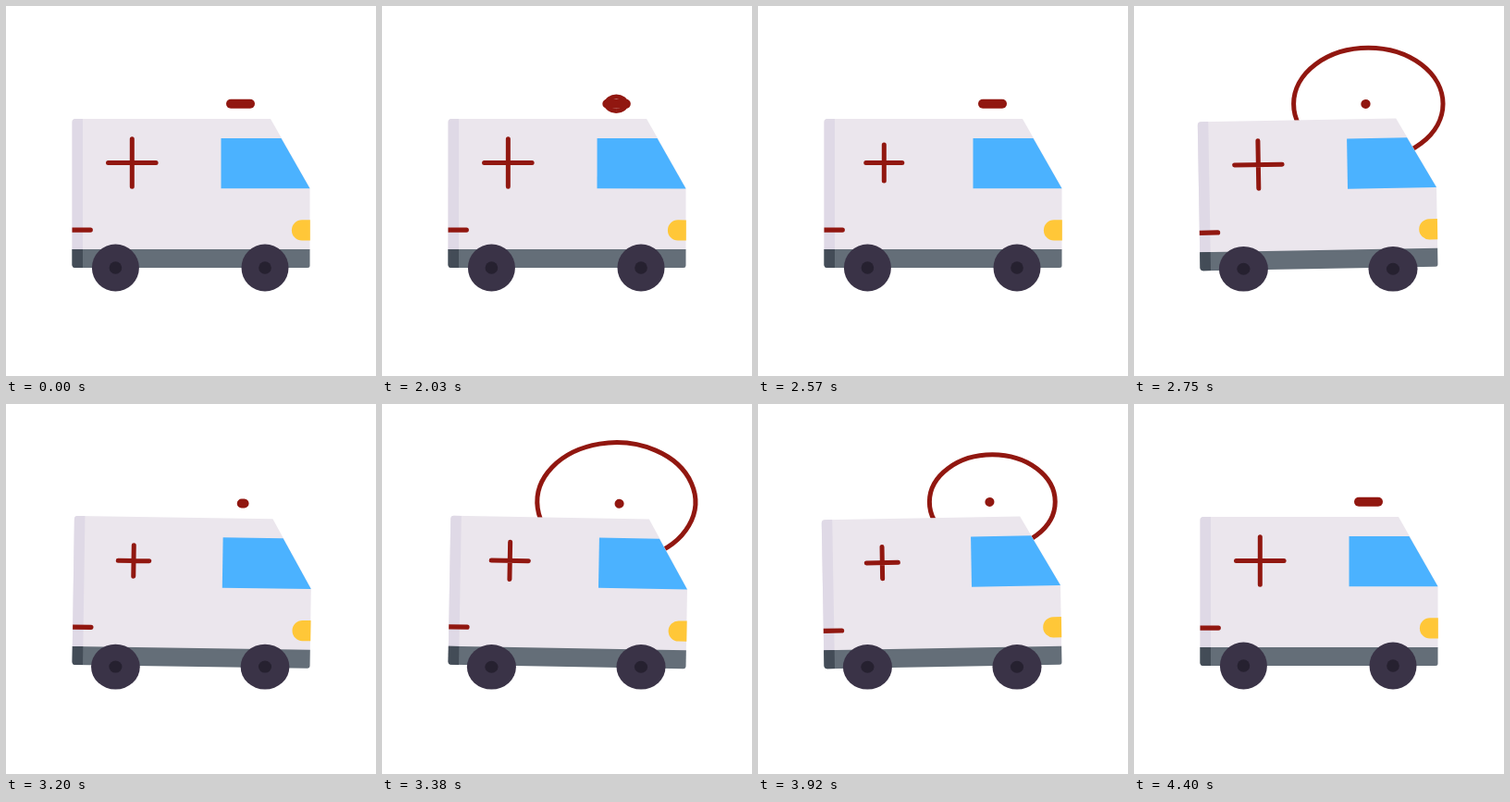
These frames come from a looping animation (400 px wide and 400 px high, 4.49 s). An HTML page:

```html
<!DOCTYPE html>
<html lang="en">
<head>
<meta charset="utf-8">
<title>Ambulance</title>
<style>
html, body { margin: 0; width: 100%; height: 100%; overflow: hidden; background: #fff; }
svg { display: block; width: 100vw; height: 100vh; }
.red { fill: none; stroke: #911710; stroke-width: 5; stroke-linecap: round; }
</style>
</head>
<body>
<svg viewBox="0 0 400 400">
  <path id="ring" class="red" style="stroke-linecap:butt"/>
  <g id="van">
    <path id="lamp" class="red" style="stroke-width:10"/>
    <path fill="#ebe6ed" d="M75 122H286L328.5 197V264H71.5V125.500Q71.500 122 75 122Z"/>
    <path fill="#dfd9e6" d="M75 122H83V264H71.500V125.500Q71.500 122 75 122Z"/>
    <path fill="#646e78" d="M71.500 263H328.500V280.500Q328.500 283 326 283H75Q71.500 283 71.500 279.500Z"/>
    <path fill="#434c57" d="M71.500 263H83V283H75Q71.500 283 71.500 279.500Z"/>
    <path fill="#4bb2ff" d="M232.500 143H297.500L328.500 197.300H232.500Z"/>
    <path fill="#ffc738" d="M328.800 231.300H320A11.100 11.100 0 0 0 320 253.500H328.800Z"/>
    <path fill="#911710" d="M71.500 239.500H91.300A2.600 2.600 0 0 1 91.300 244.700H71.500Z"/>
    <path id="cross" class="red"/>
  </g>
  <g class="wheel"><circle r="25.500" fill="#3a3347"/><circle r="6.800" fill="#262130"/></g>
  <g class="wheel"><circle r="25.500" fill="#3a3347"/><circle r="6.800" fill="#262130"/></g>
</svg>
<script>
const LOOP = 4490, REST = 2000, STEP = 30, STEPS = 80;
const $ = id => document.getElementById(id);
const wheels = document.querySelectorAll('.wheel');
const set = (el, name, value) => el.setAttribute(name, value);
const clamp = x => Math.min(1, Math.max(0, x));
const smooth = x => x * x * (3 - 2 * x);
const cubic = x => x < 0.5 ? 4 * x ** 3 : 1 - 4 * (1 - x) ** 3;

// Rocking keys: [step, tilt in degrees]
const ROCK = [[0, 0], [11, 1], [27, -1], [44.5, 1], [62, -1], [80, 0]];

function tiltAt(n) {
  const k = Math.max(1, ROCK.findIndex(p => n <= p[0]));
  const [n0, a] = ROCK[k - 1], [n1, b] = ROCK[k];
  const x = (n - n0) / (n1 - n0);
  return a + (b - a) * (k === 1 ? smooth(x) : cubic(x));
}

// The ring grows from the lamp, then is wiped counterclockwise from its foot.
function ringPath(n) {
  const p = n % 20;
  if (p === 0 || p > 10) return '';
  const rx = 85.5 * smooth(clamp(p / 6) ** 0.85), ry = rx * 0.75;
  const wipe = smooth(clamp((p - 5) / 5.5));
  const from = Math.PI * (0.5 - 2 * wipe * 0.78);
  const to = -Math.PI * 1.499;
  const at = a => `${253.3 + rx * Math.cos(a)} ${105.8 + ry * Math.sin(a)}`;
  const mid = (from + to) / 2;
  const arc = a => `A${rx} ${ry} 0 0 0 ${at(a)}`;
  return `M${at(from)}${arc(mid)}${arc(to)}`;
}

function crossPath(n) {
  const p = (n * 3 / STEPS) % 1;
  const r = 25.8 * (1 - 0.35 * cubic(1 - Math.abs(2 * p - 1)));
  return `M${136.3 - r} 169.500h${2 * r}M136.300 ${169.5 - r}v${2 * r}`;
}

function draw(t) {
  const n = Math.min(STEPS, Math.max(0, Math.floor((t - REST) / STEP)));
  const tilt = tiltAt(n), squash = Math.abs(tilt);
  set($('van'), 'transform', `translate(0 ${squash}) rotate(${tilt} 200 283)`);
  const half = Math.max(0.01, 10.5 * (1 - squash));
  set($('lamp'), 'd', `M${253.5 - half} 105.800H${253.5 + half}`);
  set($('ring'), 'd', ringPath(n));
  set($('cross'), 'd', crossPath(n));
  const sx = 1 + 0.04 * squash, sy = 1 - 0.05 * squash;
  wheels.forEach((w, i) =>
    set(w, 'transform', `translate(${i ? 280 : 118.4} ${308.5 - 25.5 * sy}) scale(${sx} ${sy})`));
}

const start = performance.now();
function tick() {
  draw((performance.now() - start) % LOOP);
  requestAnimationFrame(tick);
}
tick();
</script>
</body>
</html>
```
